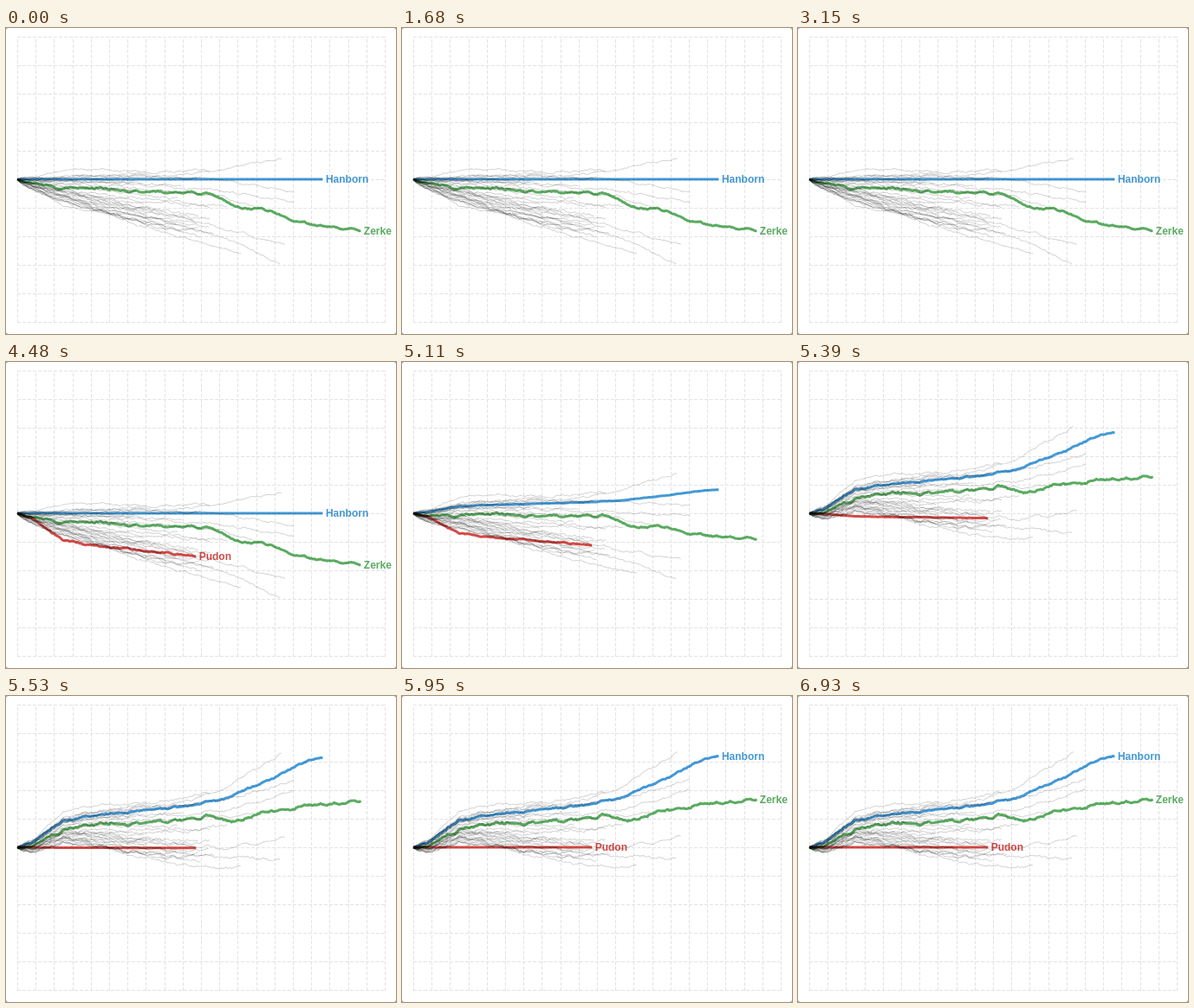
Recreate the animation shown at these times as an HTML page with a canvas. Size 450 px wide and 354 px high, loop 7 s.

```html
<!DOCTYPE html>
<html lang="en">
<head>
<meta charset="utf-8">
<title>Career comparison</title>
<style>
  html, body { margin: 0; width: 100%; height: 100%; overflow: hidden; background: #fff; }
  canvas { display: block; }
</style>
</head>
<body>
<canvas id="chart" width="450" height="354"></canvas>
<script>
const ctx = document.getElementById('chart').getContext('2d');
const LOOP = 7000, LEFT = 13, ZERO = 175, STEP = 1.33;
const BLUE = '#4499d6', GREEN = '#5bab61', RED = '#d34a46', GRAY = 'rgba(0,0,0,0.18)';

let seed = 71;
function rand() {
  seed = (seed * 1664525 + 1013904223) % 4294967296;
  return seed / 4294967296;
}

// Piecewise linear curve from (LEFT, 0) through x, y pairs.
function curve(...pairs) {
  return x => {
    let x0 = LEFT, y0 = 0;
    for (let i = 0; i < pairs.length; i += 2) {
      const x1 = pairs[i], y1 = pairs[i + 1];
      if (x <= x1) return y0 + (y1 - y0) * (x - x0) / (x1 - x0);
      x0 = x1;
      y0 = y1;
    }
    return y0;
  };
}

// A decaying random walk, one value per game.
function walk(count, rough) {
  let noise = 0;
  return Array.from({ length: count }, () => {
    const value = noise;
    noise = noise * 0.85 + (rand() - 0.5) * rough;
    return value;
  });
}

const gameX = i => LEFT + i * STEP;
const games = end => Math.round((end - LEFT) / STEP) + 1;

// Lead of the blue player over the red one.
const leadCurve = curve(30, 5, 65, 31, 110, 39, 200, 47, 250, 56, 310, 82, 345, 101, 409, 115);
const lead = walk(games(412), 1.3).map((n, i) => leadCurve(gameX(i)) + n);

// Each point keeps its value against red and the blue lead at that game.
const flatLine = (end, isBlue) =>
  lead.slice(0, games(end)).map((ahead, i) => ({ x: gameX(i), ahead, value: isBlue ? ahead : 0 }));

function player(gap, end, rough) {
  return walk(games(end), rough).map((n, i) => {
    const x = gameX(i);
    return { x, ahead: lead[i], value: lead[i] - gap(x) - n };
  });
}

const greenGap = curve(65, 11, 110, 9.5, 150, 14, 240, 17, 265, 31, 305, 36, 330, 47, 360, 54, 409, 59);
const stars = [
  { name: 'Hanborn', color: BLUE, points: flatLine(365, true) },
  { name: 'Zerke', color: GREEN, points: player(greenGap, 409, 1.6) },
  { name: 'Pudon', color: RED, points: flatLine(219, false) }
];

// Long careers: turning point, then the final game.
const others = [
  [205, -4, 318, -24],
  [80, -12, 162, -9],
  [110, -6, 225, -2],
  [240, 0, 332, 15],
  [240, 12, 332, 26],
  [200, 43, 322, 76],
  [255, 68, 316, 98],
  [160, 55, 271, 85],
  [240, 18, 285, 31]
].map(shape => player(curve(...shape), shape[2], 1.6));

// The rest of the field fans out around a typical decline.
const decline = x => 1.35 * Math.pow(x - LEFT, 0.7);
for (let i = 0; i < 24; i++) {
  const scale = 1.15 - 1.3 * Math.pow(i / 23, 1.6);
  const bend = 6 * (rand() - 0.5), pace = 25 + 30 * rand();
  const end = 140 + 115 * rand();
  const gap = x => scale * decline(x) + bend * Math.sin((x - LEFT) / pace);
  others.push(player(gap, end, 2));
}

const span = (t, from, length) => Math.max(0, Math.min(1, (t - from) / length));
const ease = u => u < 0.5 ? 4 * u ** 3 : 1 - 4 * (1 - u) ** 3;

function drawGrid() {
  ctx.strokeStyle = '#e3e3e3';
  ctx.lineWidth = 1;
  ctx.setLineDash([4, 2]);
  ctx.beginPath();
  for (let i = 0; i <= 20; i++) {
    const x = Math.round(LEFT + i * 21.2) + 0.5;
    ctx.moveTo(x, 341);
    ctx.lineTo(x, 10);
  }
  for (let i = 0; i <= 10; i++) {
    const y = 10.5 + i * 33;
    ctx.moveTo(LEFT, y);
    ctx.lineTo(438, y);
  }
  ctx.stroke();
  ctx.setLineDash([]);
}

const height = (p, shift) => ZERO - p.value + p.ahead * (1 - shift);

function drawLine(points, shift, color, width) {
  ctx.strokeStyle = color;
  ctx.lineWidth = width;
  ctx.beginPath();
  for (const p of points) ctx.lineTo(p.x, height(p, shift));
  ctx.stroke();
}

function drawLabel(star, shift, alpha) {
  const last = star.points[star.points.length - 1];
  ctx.globalAlpha = alpha;
  ctx.fillStyle = star.color;
  ctx.fillText(star.name, last.x + 3.5, height(last, shift) + 4.2);
  ctx.globalAlpha = 1;
}

function draw(t) {
  const shift = ease(span(t, 4729, 952));
  const reveal = ease(span(t, 3600, 760));
  const labels = 1 - span(t, 4740, 200) + span(t, 5690, 250);
  const redLabel = Math.min(labels, span(t, 4290, 180));

  ctx.globalCompositeOperation = 'source-over';
  ctx.fillStyle = '#999';
  ctx.fillRect(0, 0, 450, 354);
  ctx.fillStyle = '#fff';
  ctx.beginPath();
  ctx.roundRect(0, 0, 450, 354, 3);
  ctx.fill();
  drawGrid();

  ctx.globalCompositeOperation = 'multiply';
  ctx.lineJoin = 'round';
  for (const points of others) drawLine(points, shift, GRAY, 0.9);

  const [blue, green, red] = stars;
  const shown = Math.round(reveal * red.points.length);
  drawLine(red.points.slice(shown), shift, GRAY, 0.9);
  drawLine(blue.points, shift, BLUE, 3);
  drawLine(green.points, shift, GREEN, 3);
  drawLine(red.points.slice(0, shown), shift, RED, 3);

  ctx.font = 'bold 12px "Liberation Sans", Arial, sans-serif';
  drawLabel(blue, shift, labels);
  drawLabel(green, shift, labels);
  drawLabel(red, shift, redLabel);
}

function frame() {
  draw(performance.now() % LOOP);
  requestAnimationFrame(frame);
}
frame();
</script>
</body>
</html>
```
